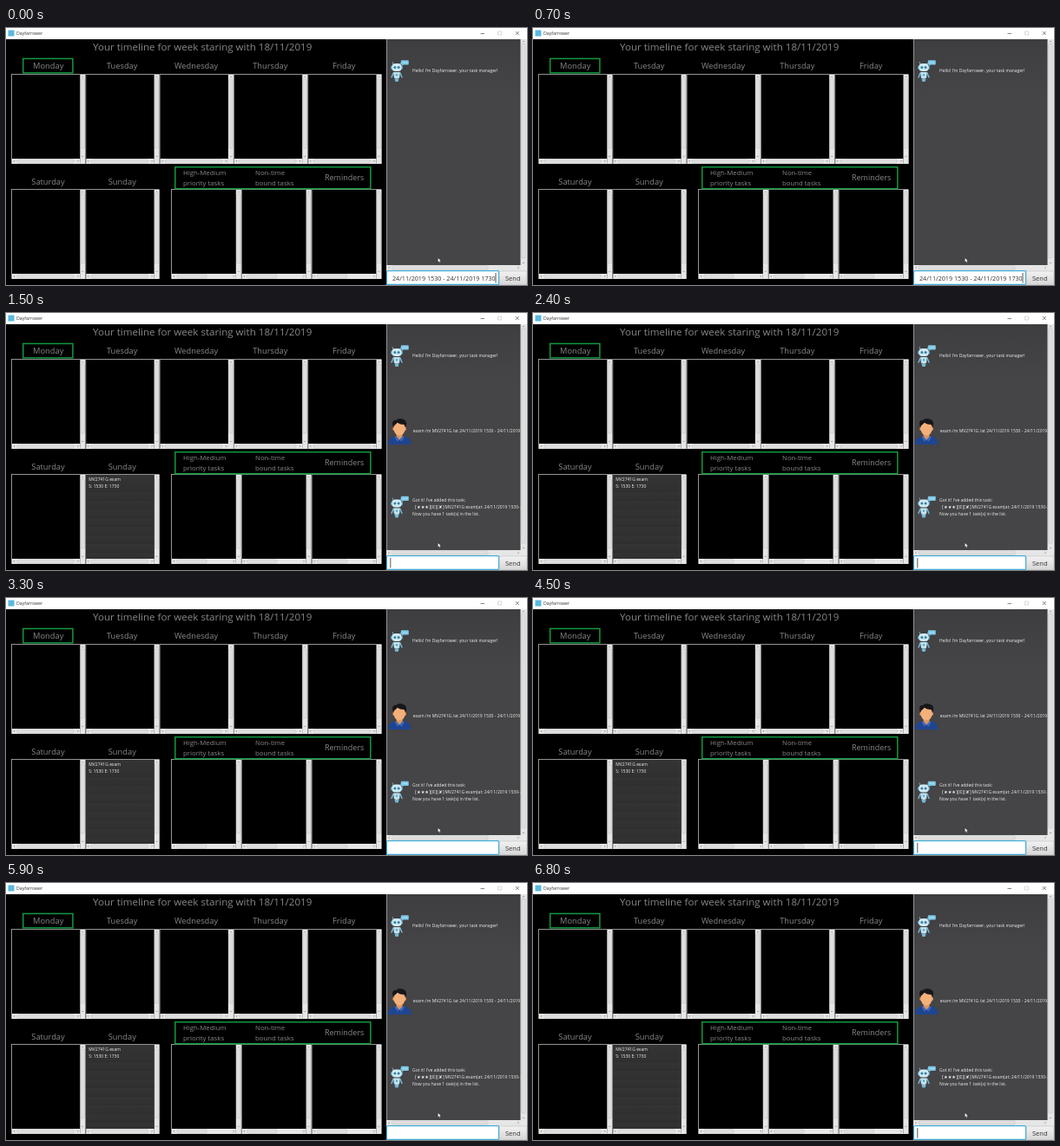
These frames come from a looping animation (600 by 297 pixels, 6900 ms). An HTML page:

```html
<!DOCTYPE html>
<html lang="en">
<head>
<meta charset="utf-8">
<title>Weekly timeline</title>
<style>
  html, body { margin: 0; width: 100%; height: 100%; overflow: hidden; background: #000; }
  svg { display: block; width: 600px; height: 297px; }
  text { font-family: "Open Sans", "Noto Sans", sans-serif; white-space: pre; }
  .head { fill: #878787; }
  .day { font-size: 9.3px; text-anchor: middle; }
  .group { font-size: 7.8px; }
  .chat { font-size: 5px; fill: #f0f0f0; }
  .symbols { font-family: "DejaVu Sans", sans-serif; font-size: 5.2px; }
  .frame { fill: none; stroke: #12983f; stroke-width: 1.5; }
  .icon { fill: none; stroke: #555; stroke-width: .7; }
  .faint { stroke: #c8c8c8; }
</style>
</head>
<body>
<svg viewBox="0 0 600 297">
  <defs>
    <linearGradient id="chatBg" x2="0" y2="1">
      <stop offset="0" stop-color="#3e3d3f"/>
      <stop offset=".25" stop-color="#454446"/>
      <stop offset="1" stop-color="#454446"/>
    </linearGradient>
    <linearGradient id="cell" x2="0" y2="1">
      <stop offset="0" stop-color="#343435"/>
      <stop offset="1" stop-color="#303031"/>
    </linearGradient>
    <linearGradient id="button" x2="0" y2="1">
      <stop offset="0" stop-color="#f2f2f2"/>
      <stop offset="1" stop-color="#d6d6d6"/>
    </linearGradient>
    <clipPath id="chatClip"><rect x="438" y="13" width="154.5" height="261"/></clipPath>
    <clipPath id="fieldClip"><rect x="443" y="282" width="123" height="14"/></clipPath>

    <g id="robot">
      <path d="M446 42l-1-3M454 42l.6-2" stroke="#7fc0da" stroke-width=".8"/>
      <rect x="443" y="43.4" width="14" height="4.6" rx="2" fill="#5fabca"/>
      <rect x="444.4" y="41" width="11.2" height="9" rx="4" fill="#cdeaf5"/>
      <circle cx="447.9" cy="45.4" r="1.5" fill="#3f7f9c"/>
      <circle cx="452.1" cy="45.4" r="1.5" fill="#3f7f9c"/>
      <path d="M446 52l-2 5M454 52l2 5" stroke="#79bdd8" stroke-width="1.4" stroke-linecap="round"/>
      <path d="M446.2 51h7.6l-.7 6.6q-3.1 2.2-6.2 0z" fill="#bfe3f1"/>
      <circle cx="450" cy="54.2" r="1.2" fill="#5aa6c6"/>
      <path d="M447.4 58.4h5.2l-1 3.6h-3.2z" fill="#73b9d5"/>
      <path d="M455.8 37.2h7q1 0 1 1v3.4q0 1-1 1h-5l-1.6 1.5v-1.5q-1.4 0-1.4-1v-3.4q0-1 1-1z" fill="#7cc7e6"/>
      <path d="M457 39.9h5" stroke="#e6f8ff" stroke-width=".9" stroke-dasharray="1 1"/>
    </g>

    <g id="person">
      <path d="M439.8 152q0-7.6 7.4-9.4h12q7.4 1.8 7.4 9.4z" fill="#1f4591"/>
      <path d="M449.6 139h7v4l-3.5 3.8-3.5-3.8z" fill="#dc9460"/>
      <path d="M449.2 142.4l4 4.2 4-4.2 1.6 1.2-3.2 4.8-2.4-2-2.4 2-3.2-4.8z" fill="#3c68bd"/>
      <rect x="445.4" y="131.6" width="15.4" height="4.6" rx="2" fill="#e59a62"/>
      <ellipse cx="453.1" cy="133.6" rx="6.5" ry="8" fill="#f4b07a"/>
      <path d="M446 132.4q-2.4-6.2 1-8.6l1.4.4q5-4 10.6-.6 3.6 2.4 1.2 8.8l-1-3.4q-5 .2-8.6-2.2-2 3-3.8 3z" fill="#17171b"/>
    </g>
  </defs>

  <rect width="600" height="13" fill="#fff"/>
  <rect x="2.5" y="2.5" width="7" height="7" fill="#58b9df"/>
  <text x="12" y="8.4" font-size="5.2" fill="#333">Dayfarrower</text>
  <path class="icon" d="M546.5 6.5h4.5M586.8 4l4 4m0-4l-4 4"/>
  <path class="icon faint" d="M566.5 4h4v4h-4z"/>

  <text class="head" x="100" y="26" font-size="11.6">Your timeline for week staring with 18/11/2019</text>
  <g id="board"></g>
  <rect class="frame" x="19.7" y="35.4" width="57.2" height="16.4"/>
  <rect class="frame" x="194.8" y="160.7" width="225" height="25"/>
  <g class="head group">
    <text x="204" y="169.6">High-Medium</text>
    <text x="204" y="182">priority tasks</text>
    <text x="287" y="169.6">Non-time</text>
    <text x="287" y="182">bound tasks</text>
    <text x="367" y="176.2" style="font-size:9px">Reminders</text>
  </g>

  <rect x="438" y="13" width="162" height="284" fill="#e9e9e9"/>
  <rect x="438.5" y="13" width="154" height="261" fill="url(#chatBg)"/>
  <g id="bars"></g>

  <use href="#robot"/>
  <text class="chat" x="468" y="51.3" style="font-size:4.95px">Hello! I'm Dayfarrower, your task manager!</text>

  <rect x="568" y="281" width="32" height="16" fill="url(#button)" stroke="#bdbdbd" stroke-width=".6"/>
  <text x="575" y="291.8" font-size="7.5" fill="#333">Send</text>
  <rect x="438.5" y="280.6" width="129" height="15.8" rx="1" fill="#fff" stroke="#45aed8" stroke-width="1.2"/>

  <g id="before">
    <g clip-path="url(#fieldClip)">
      <text x="445" y="291.6" font-size="7.18" fill="#333">24/11/2019 1530 - 24/11/2019 1730</text>
    </g>
  </g>

  <g id="after">
    <g id="cells"></g>
    <g class="chat">
      <text x="95.3" y="194.3">MV2741G exam</text>
      <text x="95.3" y="202.3">S: 1530 E: 1730</text>
    </g>
    <g class="chat" clip-path="url(#chatClip)">
      <use href="#person"/>
      <text x="468.8" y="138.3">exam /m MV2741G /at 24/11/2019 1530 - 24/11/2019 1730</text>
      <use href="#robot" y="174.5"/>
      <text x="468" y="218.2">Got it! I've added this task:</text>
      <text class="symbols" x="471" y="226.2">[★★★][E][✘]</text>
      <text x="505.5" y="226.2">MV2741G exam(at: 24/11/2019 1530-24/11/2019 1730)</text>
      <text x="468" y="233.8">Now you have 1 task(s) in the list.</text>
    </g>
  </g>

  <rect id="caret" y="283" width="1" height="11.5" fill="#555"/>
  <path d="M497.3 265.4v5.4l1.3-1.1.9 1.9 1-.5-.9-1.8h1.7z" fill="#fff" stroke="#111" stroke-width=".4"/>
</svg>

<script>
  const $ = id => document.getElementById(id);
  const rect = (x, y, w, h, fill, more = '') =>
    `<rect x="${x}" y="${y}" width="${w}" height="${h}" fill="${fill}" ${more}/>`;
  const arrow = d => `<path d="${d}" fill="none" stroke="#777" stroke-width=".6"/>`;
  const thumb = (x, y, w, h) =>
    rect(x, y, w, h, '#dfdfdf', 'rx="1" stroke="#bdbdbd" stroke-width=".5"');

  function vBar(x, y, h, end) {
    const m = x + 3, b = y + h;
    return rect(x, y, 6, h, '#e6e6e6') + thumb(x + .8, y + 5, 4.4, end - y - 5) +
      arrow(`M${m - 1.2} ${y + 3.2}l1.2-1.2 1.2 1.2`) +
      arrow(`M${m - 1.2} ${b - 3.2}l1.2 1.2 1.2-1.2`);
  }

  function hBar(x, y, w, end) {
    const m = y + 3, r = x + w;
    return rect(x, y, w, 6, '#e6e6e6') + thumb(x + 6, y + .8, end - x - 6, 4.4) +
      arrow(`M${x + 3.2} ${m - 1.2}l-1.2 1.2 1.2 1.2`) +
      arrow(`M${r - 3.2} ${m - 1.2}l1.2 1.2-1.2 1.2`);
  }

  function panel(x, y, w, thumbEnd) {
    const h = 104;
    return rect(x + .5, y + .5, w - 1, h - 1, '#000', 'stroke="#a4a4a4" stroke-width=".9"') +
      vBar(x + w - 6, y + 1, h - 7, y + h - 18) +
      hBar(x + 1, y + h - 6, w - 7, thumbEnd) +
      rect(x + w - 6, y + h - 6, 6, 6, '#e6e6e6');
  }

  // A run of panels side by side
  const row = (n, x, y, w, thumbW) =>
    Array.from({ length: n }, (_, i) => panel(x + i * w, y, w, x + i * w + thumbW)).join('');

  const day = (name, x, y) => `<text class="head day" x="${x}" y="${y}">${name}</text>`;

  const days = [
    ['Monday', 48.7, 47.2], ['Tuesday', 133.7, 47.2], ['Wednesday', 219, 47.2],
    ['Thursday', 304.3, 47.2], ['Friday', 389.3, 47.2],
    ['Saturday', 48.5, 180.6], ['Sunday', 133.8, 180.6]
  ].map(d => day(...d)).join('');
  $('board').innerHTML =
    row(5, 6, 53, 85.3, 72) + row(2, 6, 186, 85.3, 72) + row(3, 190, 186, 80.8, 41) + days;

  $('bars').innerHTML = vBar(593, 13, 261, 266) + hBar(438.5, 274, 154, 555);

  // One tall cell for the task, then empty rows
  let rows = rect(92, 187, 78.6, 19, 'url(#cell)');
  for (let y = 206; y < 284; y += 10) {
    rows += rect(92, y, 78.6, Math.min(10, 284 - y), 'url(#cell)') + rect(92, y, 78.6, .5, '#29292a');
  }
  $('cells').innerHTML = rows;

  const LOOP = 6900, SENT = 1500;
  const blink = (t, start) => (t - start + 1000) % 1000 < 500;

  function draw() {
    const t = performance.now() % LOOP;
    const sent = t >= SENT;
    $('before').style.display = sent ? 'none' : '';
    $('after').style.display = sent ? '' : 'none';
    $('caret').setAttribute('x', sent ? 442.3 : 563.5);
    $('caret').style.display = blink(t, sent ? 1400 : 700) ? '' : 'none';
    requestAnimationFrame(draw);
  }
  draw();
</script>
</body>
</html>
```
